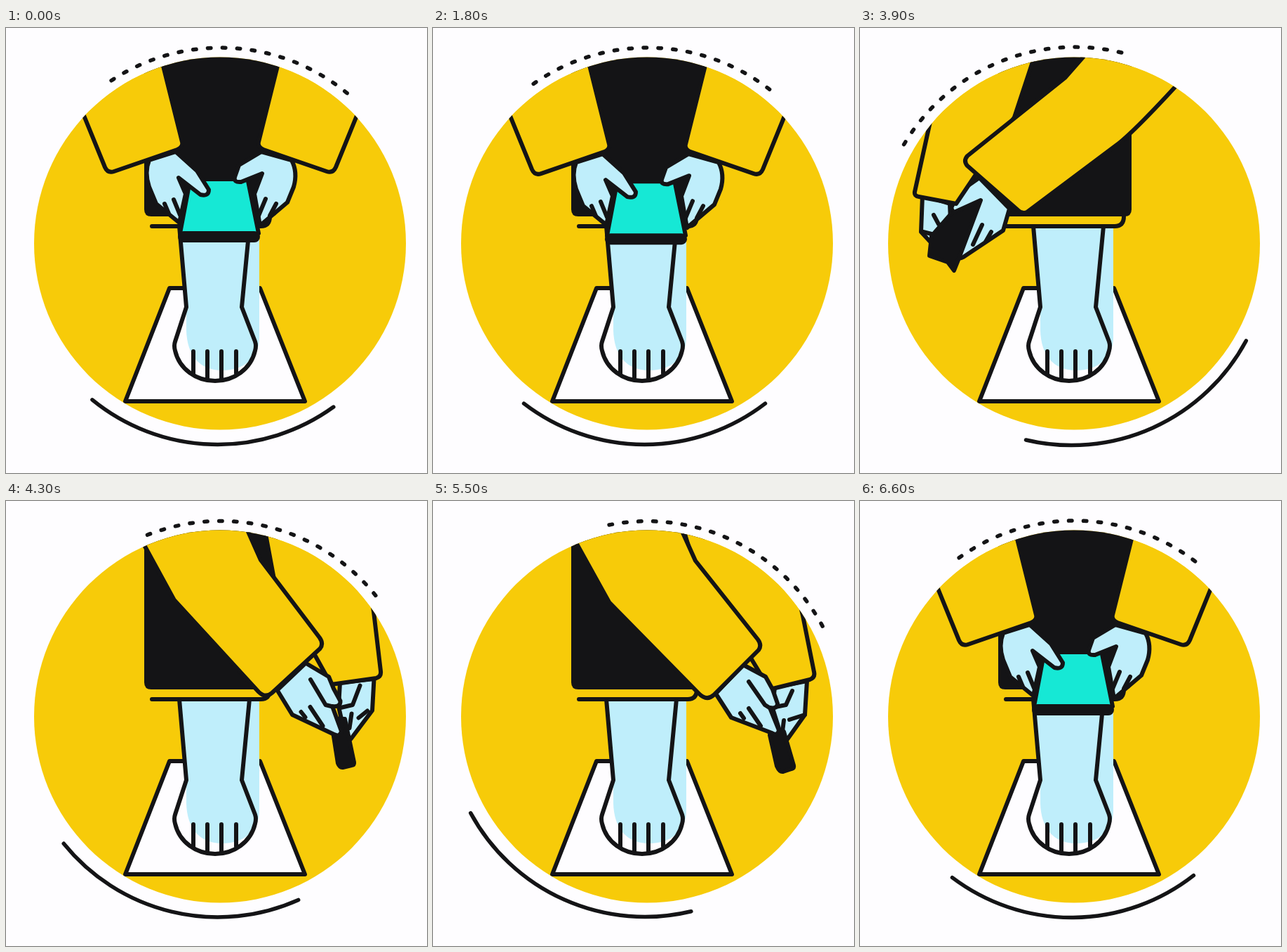
Recreate the animation shown at these times as an HTML page with a canvas. Size 600 by 633 pixels, loop 6700 ms.

```html
<!DOCTYPE html>
<html>
<head>
<meta charset="utf-8">
<style>
html, body { margin: 0; width: 100%; height: 100%; overflow: hidden; background: #fefdff }
canvas { display: block; width: 600px; height: 633px }
</style>
</head>
<body>
<canvas id="stage" width="600" height="633"></canvas>
<script>
const ctx = document.getElementById('stage').getContext('2d');
const LOOP = 6700, STEP = 100;
const WHITE = '#fefdff', YELLOW = '#f7cb09', BLACK = '#141416', SKIN = '#bfeefb', TEAL = '#16e8d5';

// Rotation of the outer arcs: [ms, degrees]
const turns = [[0, 1.7], [400, 0], [1800, 0], [2200, -31], [2400, -26], [2800, -25], [3600, -25],
  [3900, -24.2], [4100, -26], [4400, 27.3], [4700, 22.9], [5100, 25], [5500, 24], [6100, 24],
  [6400, 27], [6600, -.5], [6700, 1.7]];

function turnAt(t) {
  const i = turns.findIndex(key => key[0] > t);
  const [t0, a] = turns[i - 1], [t1, b] = turns[i];
  const u = (t - t0) / (t1 - t0);
  return a + (b - a) * u * u * (3 - 2 * u);
}

const rad = deg => deg * Math.PI / 180;
const wave = (t, period) => .5 - .5 * Math.cos(2 * Math.PI * t / period);

// Blend two path strings that have the same commands
function mix(a, b, k) {
  const ends = b.match(/-?[\d.]+/g);
  let i = 0;
  return a.replace(/-?[\d.]+/g, n => +n + (ends[i++] - n) * k);
}

function shape(d, fill, line = true) {
  const path = new Path2D(d);
  if (fill) { ctx.fillStyle = fill; ctx.fill(path); }
  if (line) ctx.stroke(path);
}

function arc(x, y, r, from, to) {
  ctx.beginPath();
  ctx.arc(x, y, r, rad(from), rad(to));
  ctx.stroke();
}

// Both arcs turn about one pivot, each slightly off centre
function arcs(deg) {
  ctx.save();
  ctx.lineWidth = 5.5;
  ctx.translate(304, 310.5);
  ctx.rotate(rad(deg));
  arc(-2.5, -.5, 282.5, 52.5, 127.5);
  for (let i = 0; i < 18; i++) {
    const mid = -124.6 + i * 4.23;
    arc(2, 1, 283.5, mid - .45, mid + .45);
  }
  ctx.restore();
}

function legs() {
  shape('M233,370H362L426,531H170Z', WHITE);
  shape('M248,282L257,397V430C258,465 275,487 308,487C338,487 361,470 361,440V282Z', SKIN, false);
  shape('M247,282L257,397L241,446Q239,452 241,459C247,485 271,502 298,502C325,502 349,485 355,459Q357,452 355,446L336,397L347,282');
  shape('M267,460V491M287,460V499M307,460V499M328,460V491');
  shape('M208,268H376Q376,282 363,282H208Z', YELLOW, false);
  shape('M208,282H363Q376,282 376,268');
  shape('M197,20H387V258Q387,268 377,268H207Q197,268 197,258Z', BLACK, false);
}

function wipe(t) {
  ctx.translate(0, 33 * wave(t, 2000));
  shape('M262,218H345L360,293H249Z', TEAL, false);
  shape('M262,218L248,292M345,218L360,292');
  ctx.fillStyle = BLACK;
  ctx.beginPath();
  ctx.roundRect(245, 289, 117, 16, 8);
  ctx.fill();
  shape('M204,188Q197,205 204,226L214,250L247,277L256,236L246,213L277,237Q289,240 289,230L272,203L242,176Z', SKIN);
  shape('M407,188Q416,205 410,226L401,248L362,281L354,236L365,207L335,219Q324,220 326,212L332,195L364,176Z', SKIN);
  shape('M226,250L232,264M239,244L248,266M370,243L360,267M385,250L376,267');
  const sleeve = 'M66,10L112,127L141,198Q145,207 154,204L244,173Q253,169 251,162L206,-18';
  shape(sleeve, YELLOW);
  ctx.translate(611, 0);
  ctx.scale(-1, 1);
  shape(sleeve, YELLOW);
}

function wringLeft(t) {
  const k = wave(t - 2400, 1000);
  const m = (a, b) => mix(a, b, k);
  shape(m('M86,238L82,285L104,322L119,345Q125,349 130,344L131,325L128,250Z',
    'M89,238L87,290L100,304L120,325Q125,328 130,323L130,300L128,250Z'), SKIN);
  shape(m('M101,264L108,277L124,286M90,289L112,295', 'M105,266L112,279L123,285M90,290L106,294'));
  shape('M170,213L140,234L130,256L134,264L137,324Q140,330 147,326L204,288L213,257Z', SKIN);
  shape('M187,290L179,304M174,280L161,308');
  shape(m('M172,245L135,264L119,292L104,325L112,329L128,334L137,323Z',
    'M172,245L130,264L102,296L99,324L125,333L134,345L142,325Z'), BLACK);
  shape(m('M115,70L80,234Q79,240 86,241L137,250L221,127L257,15',
    'M114,70L78,233Q77,239 84,240L137,250L220,127L257,15'), YELLOW);
  shape(m('M343,13L292,71L155,183Q149,190 155,197L226,260Q232,266 239,263L365,167Q388,150 449,84L490,40',
    'M343,13L292,71L153,182Q147,189 153,196L225,259Q231,265 238,262L365,167Q388,150 449,84L490,40'), YELLOW);
}

function wringRight(t) {
  const k = wave(t - 4700, 1600);
  const m = (a, b) => mix(a, b, k);
  shape(m('M465,252L516,250L514,292L478,338L470,330L464,290Z',
    'M487,265L533,256L530,304L505,339L495,330L484,295Z'), SKIN);
  shape(m('M497,255L485,290L466,295M500,293L497,306M485,293L481,318',
    'M512,270L503,290L488,293M530,304L508,311M500,312L498,328'));
  shape(m('M446,286L466,292L478,367Q478,371 474,371L461,373Q457,373 456,369Z',
    'M480,333L500,328L514,376Q515,380 511,381L499,385Q494,386 490,377Z'), BLACK);
  shape(m('M376,10L382,52L394,143L447,254L518,250Q525,249 525,241L521,152L514,70',
    'M350,10L359,47L372,90L480,268L537,254Q545,251 543,243L527,163L508,80'), YELLOW);
  shape(m('M412,228L446,250L450,266L462,281Q463,291 450,290L463,329Q461,338 452,334L391,300L370,264Z',
    'M442,233L474,250L484,268L491,288Q491,296 480,294L493,326Q491,335 483,330L425,308L403,274Z'), SKIN);
  shape(m('M418,251L438,290L450,290M417,291L436,320M403,298L410,306',
    'M450,257L473,290L481,295M450,295L467,320M438,302L443,309'));
  shape(m('M160,10L191,68L228,137L341,269Q349,277 358,270L431,208Q437,201 431,192L352,83L321,12',
    'M178,10L206,63L251,144L379,274Q390,285 400,276L464,212Q469,205 463,197L374,85L340,10'), YELLOW);
}

function draw(t) {
  ctx.fillStyle = WHITE;
  ctx.fillRect(0, 0, 600, 633);
  ctx.strokeStyle = BLACK;
  ctx.lineWidth = 6;
  ctx.lineCap = ctx.lineJoin = 'round';
  arcs(turnAt(t));
  ctx.save();
  ctx.beginPath();
  ctx.arc(305, 306.5, 265, 0, 7);
  ctx.fillStyle = YELLOW;
  ctx.fill();
  ctx.clip();
  legs();
  if (t >= 6500) wipe(0);
  else if (t < 2100) wipe(t);
  else if (t < 4200) wringLeft(t);
  else wringRight(t);
  ctx.restore();
}

const start = performance.now();
function tick() {
  const t = (performance.now() - start) % LOOP;
  draw(Math.floor(t / STEP) * STEP);
  requestAnimationFrame(tick);
}
tick();
</script>
</body>
</html>
```
